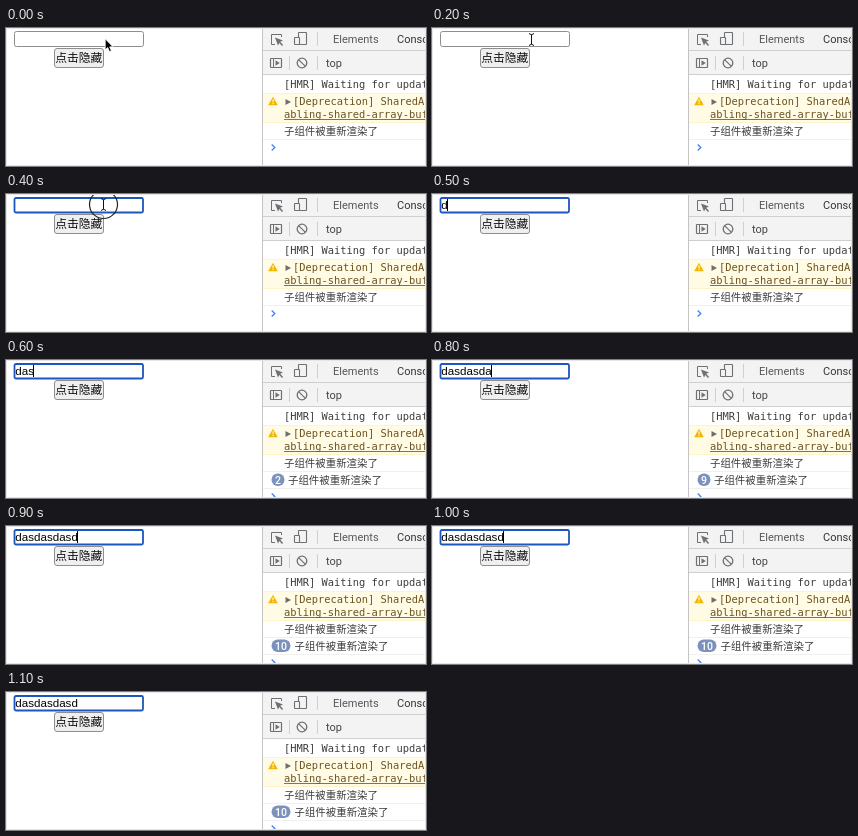
Recreate the animation shown at these times as an HTML page with a canvas. Size 420 by 138 pixels, loop 1.2 s.

```html
<!DOCTYPE html>
<html lang="zh">
<head>
<meta charset="utf-8">
<title>Input and console</title>
<style>
html, body { margin: 0; width: 100%; height: 100%; overflow: hidden; background: #fff; }
canvas { display: block; width: 420px; height: 138px; }
</style>
</head>
<body>
<canvas id="stage"></canvas>
<script>
const W = 420, H = 138, LOOP = 1200;
const SANS = '"Liberation Sans", Arial, sans-serif';
const UI = 'Roboto, sans-serif';
const MONO = '"DejaVu Sans Mono", monospace';
const CJK = '"Noto Sans CJK SC", "Noto Sans CJK", sans-serif';
const LOG = '子组件被重新渲染了';

// Each step holds until the next one begins.
const steps = [
  { at: 0, pointer: 'arrow' },
  { at: 100, pointer: 'beam' },
  { at: 400, pointer: 'beam', ring: true, focus: true },
  { at: 500, focus: true, typed: 1, caret: true },
  { at: 600, focus: true, typed: 3, caret: true, count: 2 },
  { at: 700, focus: true, typed: 5, caret: true, count: 5 },
  { at: 800, focus: true, typed: 8, caret: true, count: 9 },
  { at: 900, focus: true, typed: 10, caret: true, count: 10 },
  { at: 1100, focus: true, typed: 10, count: 10 }
];

const canvas = document.getElementById('stage');
const scale = window.devicePixelRatio || 1;
canvas.width = W * scale;
canvas.height = H * scale;
const ctx = canvas.getContext('2d');
ctx.scale(scale, scale);

function rect(x, y, w, h, color) {
  ctx.fillStyle = color;
  ctx.fillRect(x, y, w, h);
}

function box(x, y, w, h, r, fill, stroke, weight = 1) {
  ctx.beginPath();
  ctx.roundRect(x, y, w, h, r);
  if (fill) { ctx.fillStyle = fill; ctx.fill(); }
  if (stroke) { ctx.strokeStyle = stroke; ctx.lineWidth = weight; ctx.stroke(); }
}

function path(points, fill, stroke, weight = 1, close = true) {
  ctx.beginPath();
  points.forEach(([x, y]) => ctx.lineTo(x, y));
  if (close) ctx.closePath();
  if (fill) { ctx.fillStyle = fill; ctx.fill(); }
  if (stroke) { ctx.strokeStyle = stroke; ctx.lineWidth = weight; ctx.stroke(); }
}

function circle(x, y, r, color, weight) {
  ctx.beginPath();
  ctx.arc(x, y, r, 0, Math.PI * 2);
  ctx.strokeStyle = color;
  ctx.lineWidth = weight;
  ctx.stroke();
}

function text(str, x, y, size, family, color, weight = 400) {
  ctx.font = `${weight} ${size}px ${family}`;
  ctx.fillStyle = color;
  ctx.fillText(str, x, y);
  return ctx.measureText(str).width;
}

function drawForm({ focus, typed = 0, caret }) {
  if (focus) box(8.5, 4, 128.5, 14.5, 1.5, '#fff', '#1d56bd', 1.8);
  else box(8.5, 3.5, 129, 15, 2, '#fff', '#8e8e8e');
  const value = 'dasdasdasd'.slice(0, typed);
  const end = 9.3 + text(value, 9.3, 15, 11.6, SANS, '#000');
  if (caret) rect(Math.round(end - 0.5), 5, 1, 12, '#000');

  box(48.5, 20.5, 49, 19, 2.5, '#efefef', '#8e8e8e');
  text('点击隐藏', 49.2, 34, 11.8, CJK, '#111');
}

function drawToolbars() {
  const ink = '#6e7174';
  rect(257, 0, 163, 47, '#f3f3f3');
  rect(256, 0, 1, H, '#c4c4c4');
  rect(257, 22, 163, 1, '#cfcfcf');
  rect(257, 46, 163, 1, '#cfcfcf');

  // Element picker
  path([[269, 16.5], [265.5, 16.5], [265.5, 6.5], [275.5, 6.5], [275.5, 9]], null, ink, 1, false);
  path([[269, 9.5], [277, 12.5], [273.8, 14], [272, 17.5]], ink);
  path([[273, 13.5], [276.5, 17.5]], null, ink, 1.5, false);

  // Device toggle
  box(292.5, 4.5, 8, 12, 0.5, null, ink, 1.1);
  box(288.5, 9.5, 5, 7, 0.5, '#f3f3f3', ink, 1.1);

  rect(311, 4, 1, 14, '#cfcfcf');
  text('Elements', 327, 15.2, 11, UI, '#55585b');
  text('Console', 391, 15.2, 11, UI, '#333');

  // Sidebar toggle and clear button
  box(264.5, 30.5, 11, 9, 0.5, null, ink, 1.2);
  rect(267, 30, 1, 10, ink);
  path([[269.5, 32.3], [273.7, 35], [269.5, 37.7]], ink);
  rect(283, 28, 1, 14, '#cfcfcf');
  circle(296, 35, 4.8, ink, 1.3);
  path([[292.6, 31.6], [299.4, 38.4]], null, ink, 1.3, false);
  rect(311, 28, 1, 14, '#cfcfcf');
  text('top', 320, 38.5, 11, UI, '#444');
}

function drawConsole({ count }) {
  const brown = '#6b5220';
  const ink = '#3c3c3c';
  text('[HMR] Waiting for update signal', 278, 60, 10.4, MONO, ink);
  rect(257, 65, 163, 30, '#fffbe5');
  rect(257, 65, 163, 1, '#fff3c8');
  rect(257, 94, 163, 1, '#fff3c8');
  path([[267, 68.7], [271.8, 77.3], [262.2, 77.3]], '#f2b500');
  rect(266.5, 71.3, 1.1, 3, '#fff');
  rect(266.5, 75.1, 1.1, 1.1, '#fff');
  path([[279.5, 71], [285, 74], [279.5, 77]], '#6e6e6e');
  text('[Deprecation] SharedArrayBuffer', 287, 77, 10.4, MONO, brown);
  text('abling-shared-array-buffer', 278, 89.5, 10.4, MONO, brown);
  rect(278, 91, 142, 0.8, brown);

  text(LOG, 278, 107, 10.45, CJK, ink);
  rect(257, 111, 163, 1, '#f0f0f0');
  if (count) {
    const wide = count > 9;
    const width = wide ? 19 : 13;
    box(265.5, 113.5, width, 12.5, 6.25, '#7c92bd');
    ctx.textAlign = 'center';
    text(count, 265.5 + width / 2, 123.5, 10.5, UI, '#fff', 500);
    ctx.textAlign = 'left';
    text(LOG, wide ? 288.5 : 282, 124, 10.45, CJK, ink);
    rect(257, 128, 163, 1, '#f0f0f0');
  }
  const y = count ? 136.5 : 119.5;
  path([[265.7, y - 3], [268.8, y], [265.7, y + 3]], null, '#4a86ee', 1.4, false);
}

function drawPointer({ pointer, ring }) {
  if (pointer === 'arrow') {
    path([[99.2, 10.8], [99.2, 21.8], [101.7, 19.6], [103.5, 23.6],
      [105.4, 22.7], [103.7, 18.9], [106.9, 18.7]], '#000', '#fff', 0.8);
  } else if (pointer === 'beam') {
    const x = ring ? 97.5 : 99.5, y = ring ? 10.5 : 11.5;
    if (ring) circle(x, y, 14, '#222', 1.2);
    rect(x - 0.5, y - 5, 1, 10, '#111');
    [-1, 1].forEach(side =>
      path([[x - 2.5, y + side * 6], [x, y + side * 4.7], [x + 2.5, y + side * 6]],
        null, '#111', 1, false));
  }
}

function draw(time) {
  const t = time % LOOP;
  const state = steps.filter(step => step.at <= t).pop();
  rect(0, 0, W, H, '#fff');
  drawForm(state);
  drawToolbars();
  drawConsole(state);
  drawPointer(state);
  ctx.strokeStyle = '#e6e6e6';
  ctx.lineWidth = 1;
  ctx.strokeRect(0.5, 0.5, W - 1, H - 1);
}

const start = performance.now();
function tick() {
  draw(performance.now() - start);
  requestAnimationFrame(tick);
}
tick();
</script>
</body>
</html>
```
